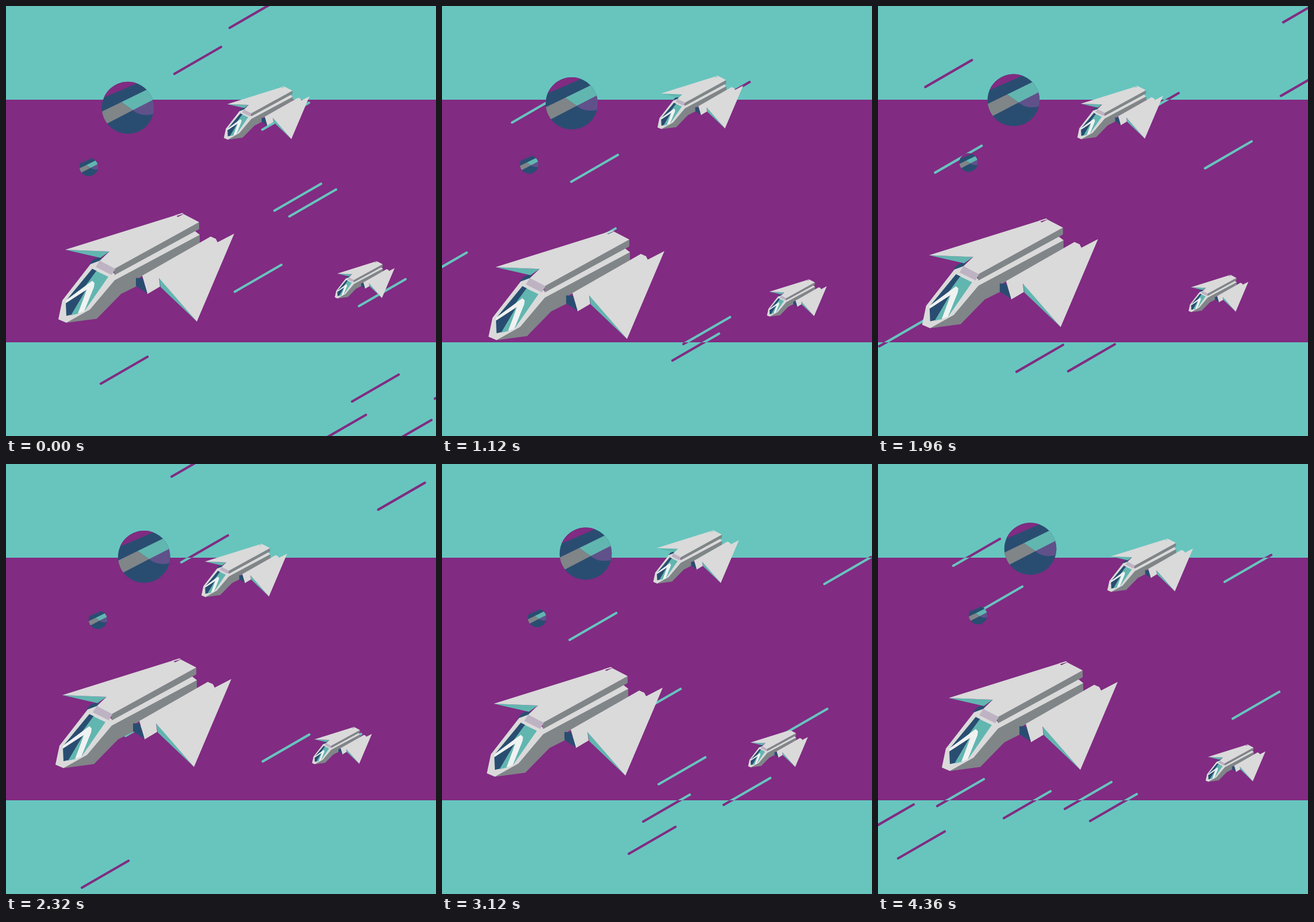
An HTML page with a canvas that plays this animation: 748 by 748 pixels, repeating every 4.4 s.

```html
<!DOCTYPE html>
<html lang="en">
<head>
<meta charset="utf-8">
<title>Starships</title>
<style>
html, body { margin: 0; width: 100%; height: 100%; overflow: hidden; background: #67c5be; }
canvas { display: block; width: 100vmin; height: 100vmin; }
</style>
</head>
<body>
<canvas id="stage" width="748" height="748"></canvas>
<script>
const ctx = document.getElementById('stage').getContext('2d');
const SIZE = 748, LOOP = 4400, STEP = 40;
const BAND_TOP = 163, BAND_BOTTOM = 585;
const TEAL = '#67c5be', PURPLE = '#812b82', LIGHT = '#dadada', GREY = '#808588';
const NAVY = '#294d71', SHADE = '#62b6b0', WHITE = '#f0f2f2', LILAC = '#beb3c3', VIOLET = '#60518b';

// Streaks: lower-left end at a known time; all share one velocity.
const SPEED = 320 / 560, RISE = 0.578;
const streaks = [
  [0, [[389, 38], [293, 118], [446, 215], [467, 356], [493, 366], [398, 497], [614, 522],
       [165, 657], [602, 688], [545, 758], [659, 767], [746, 683]]],
  [560, [[-44, 129], [134, 364], [100, 773]]],
  [1640, [[169, 94], [419, 31], [522, 134], [518, 262], [259, 304], [386, 388],
          [698, 445], [58, 742], [148, 741], [675, 694], [740, 748]]],
  [2320, [[288, 22], [305, 171], [132, 737], [208, 473]]],
  [3120, [[222, 306], [334, 438], [377, 557], [350, 622], [325, 678], [490, 593]]],
  [3800, [[46, 97], [283, 390], [521, 579], [446, 614], [297, 628], [696, 609], [5, 785]]],
  [4360, [[131, 177], [170, 260], [103, 595], [219, 616], [369, 621], [-19, 639], [35, 686]]]
];

// Ships: position of the right wing tip at each key time.
const TIP = [397, 396];
const keys = [0, 560, 1640, 2320, 3120, 3800, 4360];
const ships = [
  { scale: 0.487, x: [528, 538, 507, 489, 516.5, 520.5, 548], y: [157, 129, 152, 156, 132.5, 150, 147] },
  { scale: 0.34, x: [676, 683, 653.5, 636.5, 636.5, 661.5, 674], y: [456, 480, 488, 469.5, 475, 491.5, 500] },
  { scale: 1, x: [397, 400.5, 376.5, 392, 384, 410.5, 417], y: [396, 409, 431, 374, 389, 381, 379] }
];

const hull = [
  [NAVY, [145, 449, 153, 440, 166, 436, 163, 446]],
  [SHADE, [103, 424, 180, 427, 164, 438]],
  [GREY, [105, 551, 146, 526, 188, 475, 337, 397, 337, 412, 228, 475, 228, 487, 200, 501, 158, 544]],
  [LIGHT, [91, 545, 98, 512, 147, 449, 163, 443, 189, 466, 328, 391, 337, 398, 189, 477, 146, 528, 105, 551]],
  [GREY, [187, 457, 336, 376, 336, 388, 189, 468]],
  [LIGHT, [103, 424, 295, 364, 299, 367, 309, 362, 336, 376, 187, 458, 162, 444, 180, 427]],
  [LIGHT, [294, 364, 307, 360, 309, 361.5, 296, 365.5]],
  [LILAC, [163, 443, 190, 457, 184, 468, 156, 454]],
  [NAVY, [104, 513, 150, 457, 158, 461, 138, 488]],
  [SHADE, [157, 461, 178, 471, 137, 530, 132, 531, 152, 480, 138, 487]],
  [NAVY, [104, 516, 141, 491, 114, 537, 105, 539]],
  [SHADE, [141, 491, 126, 535, 113, 538]],
  [WHITE, [104, 512, 150, 478, 154, 482, 153, 489, 136, 531, 125, 535, 141, 493, 104, 517]],
  [SHADE, [266, 472, 332, 549, 269, 489]],
  [LIGHT, [237, 469, 356, 401, 365, 405, 368, 411, 397, 396, 332, 549, 266, 473, 268, 488, 246, 501]],
  [NAVY, [226, 473, 238, 474, 246, 500, 226, 487]]
];

function fillPoly(color, p) {
  ctx.fillStyle = color;
  ctx.beginPath();
  for (let i = 0; i < p.length; i += 2) ctx.lineTo(p[i], p[i + 1]);
  ctx.closePath();
  ctx.fill();
}

// Smooth curve through unevenly spaced keys.
function spline(v, t) {
  const last = keys.length - 1;
  let i = 0;
  while (i < last - 1 && t > keys[i + 1]) i++;
  const slope = k => {
    const a = Math.max(0, k - 1), b = Math.min(last, k + 1);
    return (v[b] - v[a]) / (keys[b] - keys[a]);
  };
  const h = keys[i + 1] - keys[i], u = (t - keys[i]) / h, w = 1 - u;
  return v[i] * (1 + 2 * u) * w * w + v[i + 1] * u * u * (3 - 2 * u)
    + h * u * w * (slope(i) * w - slope(i + 1) * u);
}

function drawBand(y, bottom, back, line, t) {
  ctx.save();
  ctx.beginPath();
  ctx.rect(0, y, SIZE, bottom - y);
  ctx.clip();
  ctx.fillStyle = back;
  ctx.fillRect(0, y, SIZE, bottom - y);
  ctx.strokeStyle = line;
  ctx.lineWidth = 4.2;
  ctx.lineCap = 'round';
  ctx.beginPath();
  for (const [time, starts] of streaks) {
    const d = (t - time) * SPEED;
    for (const [x, y0] of starts) {
      ctx.moveTo(x + d, y0 - d * RISE);
      ctx.lineTo(x + d + 81, y0 - d * RISE - 46.8);
    }
  }
  ctx.stroke();
  ctx.restore();
}

function drawPlanet(x, y, scale) {
  ctx.save();
  ctx.translate(x, y);
  ctx.scale(scale, scale);
  ctx.beginPath();
  ctx.arc(0, 0, 45.3, 0, Math.PI * 2);
  ctx.clip();
  fillPoly(NAVY, [-50, -50, 50, -50, 50, 50, -50, 50]);
  fillPoly(PURPLE, [-50, -50, 30, -50, 17, -43, -27, -24, -46, -16]);
  ctx.fillStyle = VIOLET;
  ctx.beginPath();
  ctx.moveTo(6, 2);
  ctx.quadraticCurveTo(23, 18, 48, 10);
  ctx.lineTo(48, -18);
  ctx.fill();
  fillPoly(GREY, [-48, 8, -11, -10, 9, 4, -39, 29]);
  ctx.fillStyle = SHADE;
  ctx.beginPath();
  ctx.moveTo(-11, -10);
  ctx.lineTo(36, -33);
  ctx.lineTo(50, -17);
  ctx.lineTo(9, 4);
  ctx.quadraticCurveTo(0, -2, -11, -10);
  ctx.fill();
  ctx.restore();
}

function drawShip(ship, t) {
  ctx.save();
  ctx.translate(spline(ship.x, t), spline(ship.y, t));
  ctx.scale(ship.scale, ship.scale);
  ctx.translate(-TIP[0], -TIP[1]);
  for (const [color, points] of hull) fillPoly(color, points);
  ctx.restore();
}

function draw(t) {
  drawBand(0, BAND_TOP, TEAL, PURPLE, t);
  drawBand(BAND_TOP, BAND_BOTTOM, PURPLE, TEAL, t);
  drawBand(BAND_BOTTOM, SIZE, TEAL, PURPLE, t);
  const p = t / 4360;
  drawPlanet(212 + 53 * p, 177 - 29.5 * p, 1);
  drawPlanet(144 + 30 * p, 280 - 17 * p, 0.355);
  for (const ship of ships) drawShip(ship, t);
}

const start = performance.now();
function tick() {
  const t = (performance.now() - start) % LOOP;
  draw(Math.floor(t / STEP) * STEP);
  requestAnimationFrame(tick);
}
tick();
</script>
</body>
</html>
```
